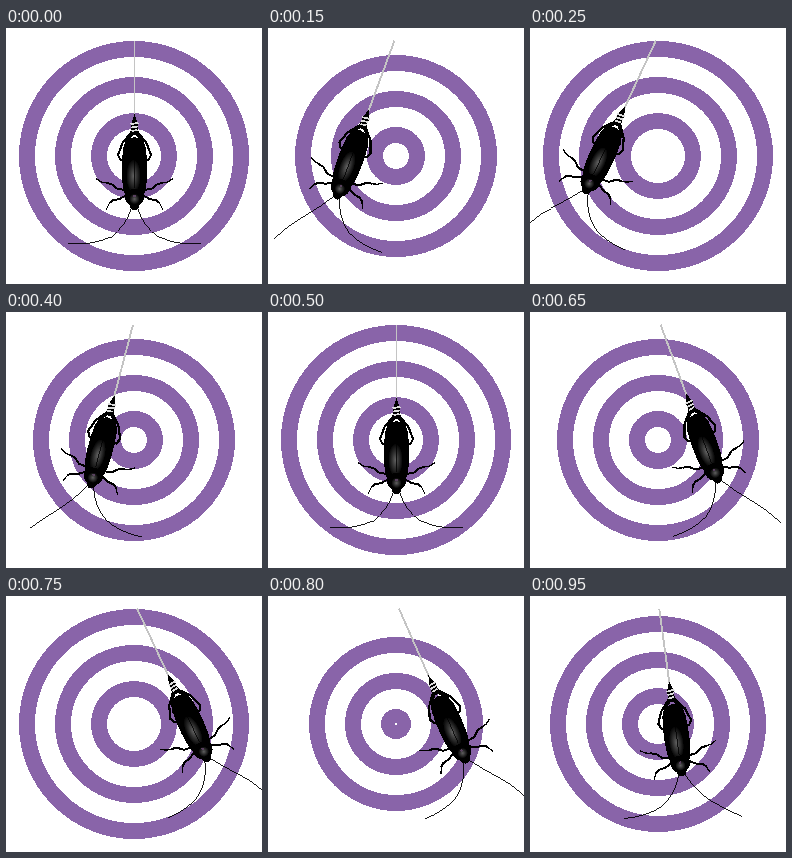
Recreate the animation shown at these times as an HTML page. Size 256x256 px, loop 1000 ms.

```html
<!DOCTYPE html>
<html lang="en">
<head>
<meta charset="utf-8">
<title>Swinging cockroach</title>
<style>
  html, body { margin: 0; width: 100%; height: 100%; overflow: hidden; background: #fff; }
  svg { display: block; width: 100%; height: 100%; }
</style>
</head>
<body>
<svg viewBox="0 0 256 256" shape-rendering="crispEdges">
  <defs>
    <radialGradient id="sheen">
      <stop offset="0" stop-color="#606060"/>
      <stop offset=".5" stop-color="#303030"/>
      <stop offset="1" stop-color="#050505"/>
    </radialGradient>
    <g id="side" fill="none" stroke="#000" stroke-linejoin="round" stroke-linecap="round">
      <path d="M-.5 94L-3 104L-12 115L-16.500 127L-14 132L-8 133" stroke-width="2.200"/>
      <path d="M-2 106L-8 113L-11 122" stroke-width="2"/>
      <path d="M-9 162L-17 161L-23 156L-28 155" stroke-width="2"/>
      <path d="M-28 155L-33 154L-38 151" stroke-width="1.300"/>
      <path d="M-8 167L-15 171L-22 172.500L-25 175" stroke-width="2"/>
      <path d="M-25 175L-28 181" stroke-width="1.300"/>
    </g>
  </defs>
  <g id="rings" fill="none" stroke="#8964a9" stroke-width="16"></g>
  <g id="swing">
    <path d="M0 13V88" stroke="#c4c4c4" stroke-width="1.900"/>
    <use href="#side"/>
    <use href="#side" transform="scale(-1 1)"/>
    <path d="M0 86L3.500 96L2.500 107H-2.500L-3.500 96Z"/>
    <path d="M-4 96L4 95M-3.500 99.500L3.500 98.500M-3 103L3 102" stroke="#ddd" stroke-width="1.800"/>
    <path d="M0 109C8 109 12 116 12.500 132C13 150 12 162 9 168H-9C-12 162 -13 150 -12.500 132C-12 116 -8 109 0 109Z"/>
    <ellipse cx="-1" cy="148" rx="7" ry="16" fill="url(#sheen)"/>
    <path d="M0 115V160" stroke="#000" stroke-width=".8"/>
    <path d="M-10 167Q-8 161 0 161Q8 161 10 167Q10 174 5 177Q4 182 0 182Q-4 182 -5 177Q-10 174 -10 167Z"/>
    <ellipse cy="171" rx="5" ry="5" fill="url(#sheen)"/>
    <circle cy="168" r="1.200" fill="#59425f"/>
    <g fill="none" stroke="#000" stroke-width=".9">
      <path id="left"/>
      <path id="right"/>
    </g>
  </g>
</svg>
<script>
const LOOP = 1000, STEP = 50, SWING = 25, RING = 16;
const PIVOT = { x: 128.5, y: 7 };
const byId = id => document.getElementById(id);

const rings = [0, 1, 2].map(() => {
  const ring = document.createElementNS('http://www.w3.org/2000/svg', 'circle');
  ring.setAttribute('cx', 128);
  ring.setAttribute('cy', 128);
  byId('rings').append(ring);
  return ring;
});

// The leading antenna straightens and droops; the trailing one only draws in.
function antenna(side, lean, leading) {
  const x = v => (side * v).toFixed(2);
  const y = v => v.toFixed(2);
  const droop = leading ? lean : 0;
  const tipX = 66.5 - (leading ? 25 : 6) * lean;
  return `M${x(3)} 180Q${x(9 + 4 * droop)} ${y(199 - 4 * droop)} ${x(24)} 209` +
    `Q${x(40 - 5 * droop)} ${y(217 + 6 * droop)} ${x(tipX)} ${y(216 + 28 * droop)}`;
}

function draw(ms) {
  const step = Math.floor(ms % LOOP / STEP);
  const outer = 87 + 7 * ((step + 4) % 5);
  rings.forEach((ring, i) => ring.setAttribute('r', Math.max(0, outer - 36 * i - RING / 2)));

  const wave = Math.sin(2 * Math.PI * step * STEP / LOOP);
  const angle = SWING * wave;
  const lean = Math.abs(wave) < 1e-6 ? 0 : Math.abs(wave) ** 0.6;
  byId('swing').setAttribute('transform',
    `rotate(${angle.toFixed(3)} ${PIVOT.x} ${PIVOT.y}) translate(${PIVOT.x} 0)`);
  byId('left').setAttribute('d', antenna(-1, lean, wave > 0));
  byId('right').setAttribute('d', antenna(1, lean, wave < 0));
}

const start = performance.now();
function tick() {
  draw(performance.now() - start);
  requestAnimationFrame(tick);
}
tick();
</script>
</body>
</html>
```
